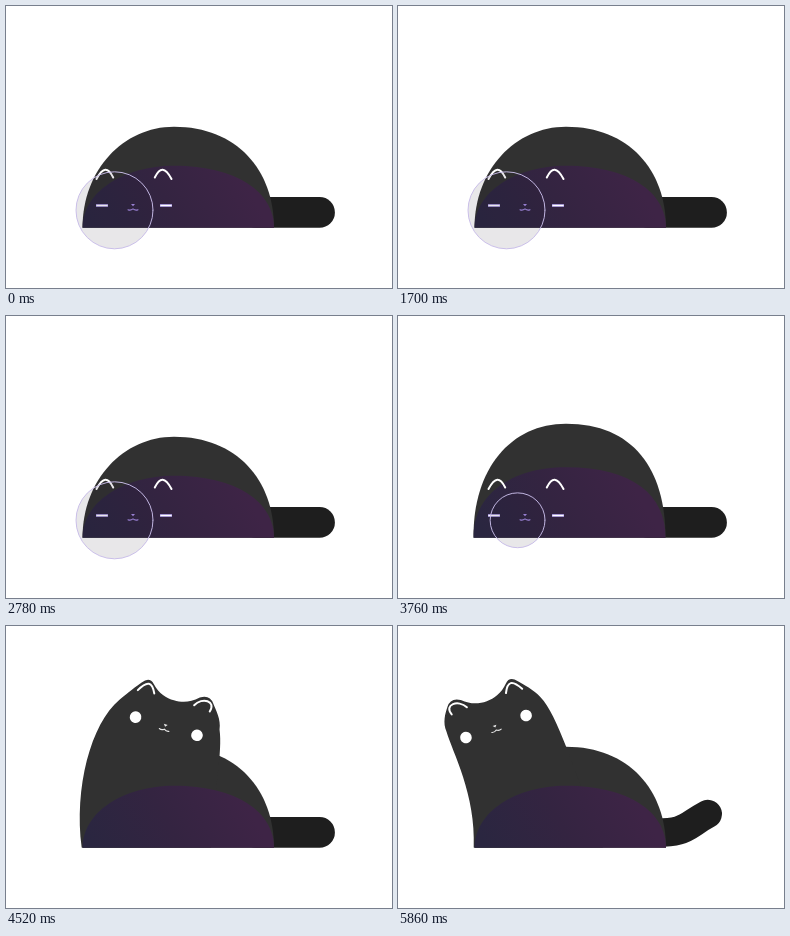
An HTML page with a canvas that plays this animation: 386x282 px, repeating every 5.88 s.

```html
<!DOCTYPE html>
<html lang="en">
<head>
<meta charset="utf-8">
<title>Sleepy cat</title>
<style>
html, body { margin: 0; width: 100%; height: 100%; overflow: hidden; background: #fff; }
canvas { display: block; width: 386px; height: 282px; }
</style>
</head>
<body>
<canvas id="stage"></canvas>
<script>
const W = 386, H = 282, LOOP = 5880, FLOOR = 221.7;
const WAKE = 4080;
const canvas = document.getElementById('stage');
const ctx = canvas.getContext('2d');
const ratio = window.devicePixelRatio || 1;
canvas.width = W * ratio;
canvas.height = H * ratio;

const mix = (a, b, u) => a + (b - a) * u;
const clamp = (v, lo, hi) => Math.min(hi, Math.max(lo, v));

// Eased value at time t from alternating time, value pairs.
function track(t, ...keys) {
  if (t <= keys[0]) return keys[1];
  for (let i = 2; i < keys.length; i += 2) {
    if (t < keys[i]) {
      const u = (t - keys[i - 2]) / (keys[i] - keys[i - 2]);
      return mix(keys[i - 1], keys[i + 1], u * u * (3 - 2 * u));
    }
  }
  return keys[keys.length - 1];
}

const bodyBreath = t => track(t, 80, 0, 720, 1, 1300, 0, 1700, 0, 2200, 1, 2780, 0, 3180, 0, 3680, 1, 4260, 0);
const bubbleBreath = t => track(t, 60, 0, 650, 1, 1240, 0, 1700, 0, 2210, 1, 2720, 0, 3180, 0, 3690, 1, 4200, 0);
const tailLift = t => track(t, 4080, 0, 4300, 0.6, 4520, 0, 4800, 0.9, 5080, 0, 5560, 1.12, 5870, 1);
const eyeOpen = t => track(t, 4090, 0, 4240, 1, 5590, 1, 5680, 0.1, 5800, 1);

function headPose(t) {
  return {
    x: track(t, WAKE, 128, 4240, 97, 4540, 161, 5000, 161, 5440, 98),
    y: track(t, WAKE, 199.5, 4540, 99.7, 5000, 99.7, 5440, 100.5),
    tilt: track(t, WAKE, 0, 4240, -18, 4540, 16.9, 5000, 16.9, 5440, -20)
  };
}

function line(color, width) {
  ctx.strokeStyle = color;
  ctx.lineWidth = width;
  ctx.stroke();
}

// Rounded mound on the floor; breath makes its shoulders fuller.
function mound(height, breath, fill) {
  const left = 76.5 - breath, right = 268 - 0.5 * breath, mid = 168;
  const top = FLOOR - height;
  const shoulder = FLOOR - height * (0.57 + 0.037 * breath);
  ctx.beginPath();
  ctx.moveTo(left, FLOOR);
  ctx.bezierCurveTo(left - breath, shoulder, mix(mid, left, 0.557 + 0.04 * breath), top, mid, top);
  ctx.bezierCurveTo(mix(mid, right, 0.63 + 0.045 * breath), top, right, shoulder, right, FLOOR);
  ctx.closePath();
  ctx.fillStyle = fill;
  ctx.fill();
}

function drawTail(t) {
  const k = tailLift(t);
  const y = 206.4;
  ctx.beginPath();
  ctx.moveTo(250, y);
  ctx.bezierCurveTo(mix(275, 290, k), mix(y, 208, k), mix(295, 287, k), mix(y, 200, k),
    mix(313.6, 309.7, k), mix(y, 188, k));
  ctx.lineCap = 'round';
  line('#1e1e1e', mix(30.6, 28.5, k));
}

function drawHead(p) {
  const a = p.tilt * Math.PI / 180, c = Math.cos(a), s = Math.sin(a);
  const k = p.tilt / 18;
  const at = (x, y) => [p.x + x * c - y * s, p.y + x * s + y * c];
  const low = Math.min(FLOOR, p.y + 62);
  const l = 3 * clamp(-k, 0, 1), r = 3 * clamp(k, 0, 1);
  ctx.save();
  ctx.beginPath();
  ctx.rect(0, 0, W, FLOOR);
  ctx.clip();
  ctx.beginPath();
  ctx.moveTo(75.7, FLOOR);
  ctx.bezierCurveTo(72.5 - 5 * k, Math.max(165 - 3 * k, low),
    ...at(-62.5 - 11.5 * k, 14.5 + 5 * k), ...at(-50.5 - 2 * k, -12));
  ctx.bezierCurveTo(...at(-46 - l, -22), ...at(-40 - l, -30), ...at(-36 - l, -35));
  ctx.quadraticCurveTo(...at(-30 - l, -43), ...at(-24, -37));
  ctx.bezierCurveTo(...at(-16, -29), ...at(-8, -27), ...at(0, -27));
  ctx.bezierCurveTo(...at(8, -27), ...at(16, -29), ...at(24, -37));
  ctx.quadraticCurveTo(...at(30 + r, -43), ...at(36 + r, -35));
  ctx.bezierCurveTo(...at(40 + r, -30), ...at(48 + r, -22), ...at(52, -12));
  ctx.bezierCurveTo(...at(61.5, 9), 194 + 16 * k, Math.max(147 + 13 * k, low - 20), 205, FLOOR);
  ctx.closePath();
  ctx.fillStyle = '#313131';
  ctx.fill();
  ctx.restore();
}

function drawFace(p, open, awake) {
  ctx.save();
  ctx.translate(p.x, p.y);
  ctx.rotate(p.tilt * Math.PI / 180);
  ctx.lineCap = 'round';
  for (const side of [-1, 1]) {
    const hook = 11 * clamp(side * p.tilt / 18, 0, 1);
    ctx.beginPath();
    ctx.moveTo(side * 20.8, -28);
    ctx.bezierCurveTo(side * 26, -38.5, side * (31 + hook), -38.5, side * 37.5, -26.5);
    line('#fff', 2);
    if (open > 0) {
      ctx.beginPath();
      ctx.ellipse(side * 32, 0, 5.8, mix(1, 5.8, open), 0, 0, 2 * Math.PI);
      ctx.fillStyle = '#fff';
      ctx.fill();
    } else {
      ctx.fillStyle = '#a996ea';
      ctx.fillRect(side * 32 - 6, -1.3, 12, 2.6);
      ctx.fillStyle = '#fff';
      ctx.fillRect(side * 32 - 5.6, -0.7, 11.2, 1.4);
    }
  }
  const ink = awake ? '#e8e8e8' : '#a58be4';
  ctx.beginPath();
  ctx.moveTo(-3, -1.6);
  ctx.lineTo(1, -1.6);
  ctx.lineTo(-1, 0.8);
  ctx.closePath();
  ctx.fillStyle = ink;
  ctx.fill();
  ctx.beginPath();
  ctx.moveTo(-6, 4.2);
  ctx.quadraticCurveTo(-3.5, 5.4, -1, 3.4);
  ctx.quadraticCurveTo(1.5, 5.4, 4, 4.2);
  line(ink, 1.1);
  ctx.restore();
}

function drawBubble(t) {
  const r = mix(39, 27.3, bubbleBreath(t));
  ctx.beginPath();
  ctx.arc(147.5 - r, 204.3, r - 0.5, 0, 2 * Math.PI);
  ctx.fillStyle = 'rgba(30,28,40,0.1)';
  ctx.fill();
  line('rgba(200,188,232,0.95)', 1);
}

function draw(t) {
  ctx.setTransform(ratio, 0, 0, ratio, 0, 0);
  ctx.fillStyle = '#fff';
  ctx.fillRect(0, 0, W, H);
  const breath = bodyBreath(t);
  const awake = t >= WAKE;
  const pose = headPose(t);

  drawTail(t);
  mound(101 + 13.8 * breath, breath, '#313131');
  if (awake) drawHead(pose);

  const purple = ctx.createLinearGradient(95, 235, 230, 160);
  purple.addColorStop(0, '#2a2640');
  purple.addColorStop(0.5, '#342441');
  purple.addColorStop(1, '#3e2446');
  mound(62 + 9 * breath, breath, purple);

  drawFace(pose, eyeOpen(t), awake);
  if (!awake) drawBubble(t);
}

const start = performance.now();
function tick() {
  draw((performance.now() - start) % LOOP);
  requestAnimationFrame(tick);
}
tick();
</script>
</body>
</html>
```
